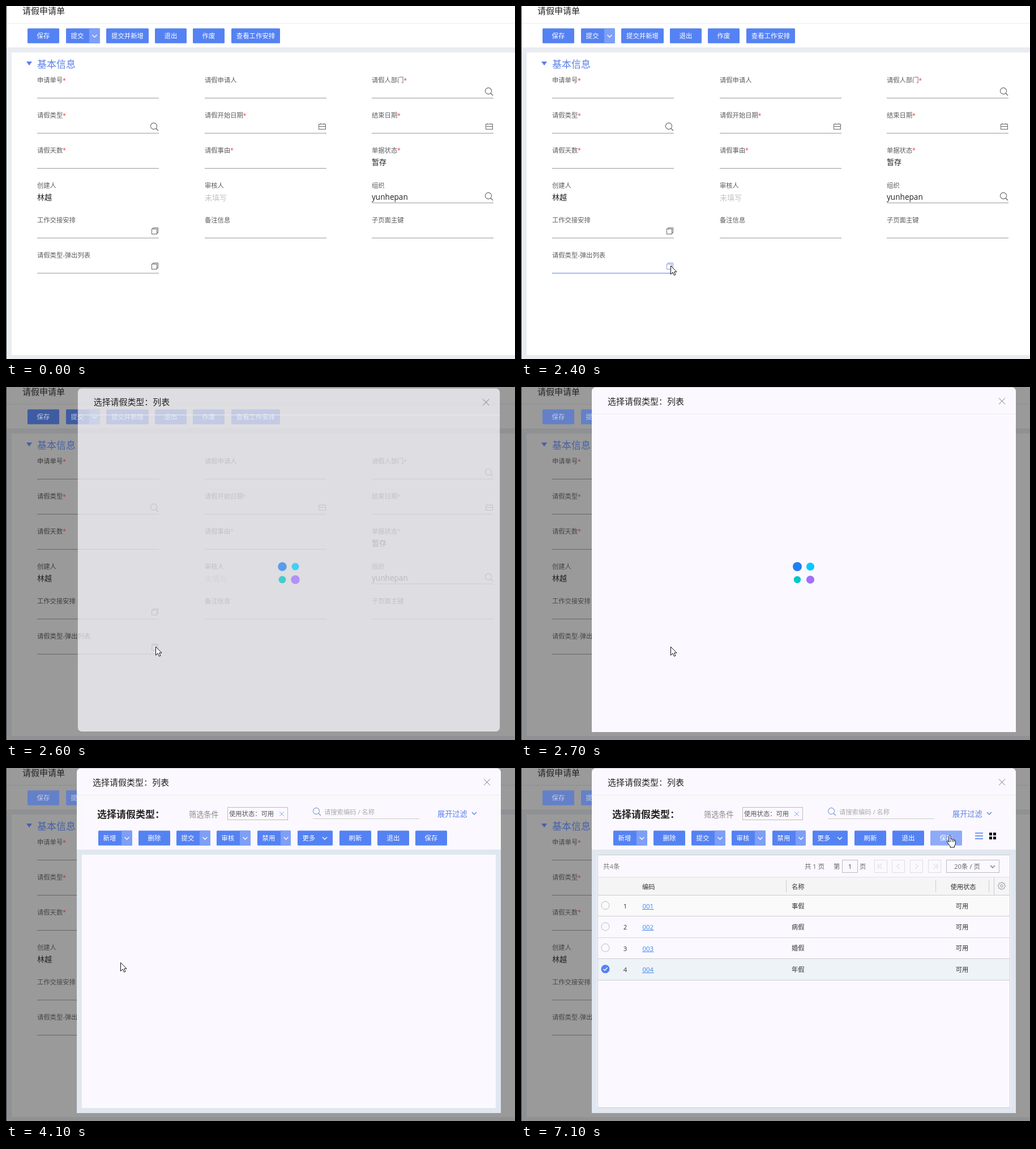
These frames come from a looping animation (899 px wide and 623 px high, 8000 ms). An HTML page with a canvas:

```html
<!DOCTYPE html>
<html lang="zh">
<head>
<meta charset="utf-8">
<title>请假申请单</title>
<style>
html, body { margin: 0; width: 100%; height: 100%; overflow: hidden; background: #fff; }
canvas { display: block; width: 899px; height: 623px; }
</style>
</head>
<body>
<canvas id="stage" width="899" height="623"></canvas>
<script>
const g = document.getElementById('stage').getContext('2d');
const LOOP = 8000, STEP = 100;
const FONT = "'Open Sans', 'Noto Sans CJK SC', 'Noto Sans CJK', sans-serif";
const BLUE = '#5582f3', PALE = '#7e9ff7', MODAL = '#fbf9ff';

const LIGHT = {
  page: '#fff', side: '#e9ecf1', rule: '#ececec', line: '#999', label: '#5c5c5c', text: '#222',
  hint: '#c3c3c3', star: '#f33', btn: BLUE, split: PALE, btnText: '#fff', head: '#5a80e8', icon: '#666'
};
const DIM = {
  page: '#9a9a9a', side: '#8f9194', rule: '#8e8e8e', line: '#666', label: '#454545', text: '#222',
  hint: '#7b7b7b', star: '#a33', btn: '#6480c8', split: '#7b92cc', btnText: '#c4cce2', head: '#4560a8', icon: '#484848'
};
const ENTER = { ...DIM, btn: '#3f5ba2', split: '#5f78b4', label: '#3c3c3c' };
const BAR = { ...LIGHT, weight: 500 };

function rect(x, y, w, h, c) { g.fillStyle = c; g.fillRect(x, y, w, h); }

function box(x, y, w, h, c) {
  g.strokeStyle = c; g.lineWidth = 1; g.strokeRect(x + .5, y + .5, w - 1, h - 1);
}

function round(x, y, w, h, r, c) {
  g.beginPath(); g.roundRect(x, y, w, h, r); g.fillStyle = c; g.fill();
}

function path(points, c, width = 1) {
  g.beginPath();
  points.forEach(([x, y], i) => i ? g.lineTo(x, y) : g.moveTo(x, y));
  g.strokeStyle = c; g.lineWidth = width; g.stroke();
}

function disc(x, y, r, c) { g.beginPath(); g.arc(x, y, r, 0, 7); g.fillStyle = c; g.fill(); }

function ring(x, y, r, c, width = 1) {
  g.beginPath(); g.arc(x, y, r, 0, 7); g.strokeStyle = c; g.lineWidth = width; g.stroke();
}

// y is the middle of the line; returns the text width
function text(s, x, y, size, c, align = 'left', weight = 400) {
  g.font = `${weight} ${size}px ${FONT}`;
  g.textAlign = align;
  g.fillStyle = c;
  g.fillText(s, x, y + size * .37);
  return g.measureText(s).width;
}

function chevron(x, y, c, s = 4) { path([[x - s, y - s / 2], [x, y + s / 2], [x + s, y - s / 2]], c, 1.3); }

function cross(x, y, s, c) {
  path([[x - s, y - s], [x + s, y + s]], c);
  path([[x - s, y + s], [x + s, y - s]], c);
}

function lens(x, y, c) {
  ring(x - 1, y - 1, 5.6, c, 1.1);
  path([[x + 3, y + 3], [x + 7, y + 7]], c, 1.2);
}

function calendar(x, y, c) {
  box(x - 6, y - 4, 13, 10, c);
  rect(x - 6, y, 13, 1, c);
  rect(x - 3, y - 5, 1, 2, c);
  rect(x + 3, y - 5, 1, 2, c);
}

function popup(x, y, c) {
  box(x - 6, y - 4, 10, 10, c);
  path([[x - 3.5, y - 4], [x - 3.5, y - 5.5], [x + 5.5, y - 5.5], [x + 5.5, y + 3.5], [x + 4, y + 3.5]], c);
}

// kind: 1 = split with a paler arrow part, 2 = arrow only
function button(x, y, w, label, p, kind = 0) {
  const h = 26.3;
  round(x, y + .4, w, h, 1.5, p.btn);
  if (kind === 1) round(x + 41, y + .4, w - 41, h, [0, 1.5, 1.5, 0], p.split);
  const mid = kind ? x + 20 : x + w / 2;
  text(label, mid, y + 13.5, 11.4, p.btnText, 'center', p.weight);
  if (kind) chevron(kind === 1 ? x + 50.5 : x + 48, y + 14, p.btnText);
}

const COLS = [55, 351, 646];
// column, row, label, required, icon, value, underlined
const FIELDS = [
  [0, 0, '申请单号', 1], [1, 0, '请假申请人', 0], [2, 0, '请假人部门', 1, lens],
  [0, 1, '请假类型', 1, lens], [1, 1, '请假开始日期', 1, calendar], [2, 1, '结束日期', 1, calendar],
  [0, 2, '请假天数', 1], [1, 2, '请假事由', 1], [2, 2, '单据状态', 1, null, '暂存', 0],
  [0, 3, '创建人', 0, null, '林越', 0], [1, 3, '审核人', 0, null, '未填写', 0], [2, 3, '组织', 0, lens, 'yunhepan'],
  [0, 4, '工作交接安排', 0, popup], [1, 4, '备注信息', 0], [2, 4, '子页面主键', 0],
  [0, 5, '请假类型-弹出列表', 0, popup]
];

function field([col, row, label, need, icon, value, lined = 1], p, pos) {
  const x = COLS[col], y = 131 + row * 61.8;
  const hot = p === LIGHT && pos && pos[0] > x && pos[0] < x + 216 && pos[1] > y + 8 && pos[1] < y + 32;
  const w = text(label, x, y, 11.3, p.label);
  if (need) text('*', x + w, y, 10, p.star);
  if (value === '未填写') text(value, x, y + 22, 13, p.hint);
  else if (value) text(value, x, y + 20.5, value.length > 4 ? 13.6 : 13, p.text);
  if (lined) rect(x, Math.round(y + 31), 215, 1, hot ? BLUE : p.line);
  if (icon) {
    const iy = Math.round(y + (icon === lens ? 20 : 19));
    const ix = x + (icon === popup ? 208 : 207);
    icon(ix, iy, hot ? '#8b9be8' : p.icon);
  }
}

function form(p, pos) {
  rect(0, 0, 899, 623, p.page);
  rect(1, 73, 898, 9, p.side);
  rect(1, 82, 9, 541, p.side);
  rect(1, 616, 898, 7, p.side);
  rect(0, 30, 899, 1, p.rule);
  rect(0, 0, 1, 623, '#333');
  text('请假申请单', 29, 8, 15, p.text);
  button(38, 39, 56, '保存', p);
  button(106, 39, 60, '提交', p, 1);
  button(177, 39, 75, '提交并新增', p);
  button(263, 39, 56, '退出', p);
  button(330, 39, 56, '作废', p);
  button(398, 39, 86, '查看工作安排', p);
  g.beginPath();
  g.moveTo(36, 98); g.lineTo(46, 98); g.lineTo(41, 105);
  g.fillStyle = p.head; g.fill();
  text('基本信息', 55, 102.5, 17, p.head);
  FIELDS.forEach(f => field(f, p, pos));
}

function spinner(t) {
  ['#2080f0', '#00caff', '#00c6c6', '#a070ff'].forEach((c, i) => {
    const r = 7.1 + .9 * Math.cos((t - 2700) / 800 * 2 * Math.PI - i * Math.PI / 2);
    disc(488 + i % 2 * 23, 317 + (i >> 1) * 23, r, c);
  });
}

function toolbar(t) {
  rect(125, 48, 749, 96, '#f9f9fb');
  rect(134, 58, 731, 86, MODAL);
  text('选择请假类型：', 161, 82, 17, '#222', 'left', 700);
  text('筛选条件', 323, 82, 13.2, '#888');
  box(391, 69, 107, 23, '#bbb');
  text('使用状态：可用', 394, 81, 11.3, '#555');
  cross(487, 81, 4, '#8ba6dc');
  lens(549, 77, '#8799cc');
  text('请搜索编码 / 名称', 562, 77.5, 11.3, '#aaa');
  rect(542, 89, 188, 1, '#ccc');
  text('展开过滤', 762, 81, 13.2, '#5a80e8');
  chevron(827, 80, '#5a80e8');
  const p = BAR, y = 110;
  button(163, y, 60, '新增', p, 1);
  button(234, y, 56, '删除', p);
  button(301, y, 60, '提交', p, 1);
  button(372, y, 60, '审核', p, 1);
  button(444, y, 59, '禁用', p, 1);
  button(515, y, 62, '更多', p, 2);
  button(589, y, 56, '刷新', p);
  button(656, y, 56, '退出', p);
  button(723, y, 56, '保存', t >= 7000 ? { ...p, btn: '#8eabf8' } : p);
}

function viewIcons() {
  for (let i = 0; i < 3; i++) rect(802, 114 + i * 5, 14, 1.6, BLUE);
  for (let i = 0; i < 4; i++) rect(827 + i % 2 * 7, 114 + (i >> 1) * 7, 5, 5, '#111');
}

function pager() {
  const y = 173.5;
  text('共4条', 145, y, 11.4, '#777');
  text('共 1 页', 501, y, 11.4, '#666');
  text('第', 552, y, 11.4, '#666');
  box(567, 162, 28, 23, '#bbb');
  text('1', 581, y, 11.4, '#444', 'center');
  text('页', 598, y, 11.4, '#666');
  for (let i = 0; i < 4; i++) {
    const x = 624 + i * 31.7 | 0, d = i < 2 ? -1 : 1, cx = x + 11.5;
    box(x, 162, 23, 23, '#ddd');
    path([[cx - d * 2, 169], [cx + d * 2.5, 173.5], [cx - d * 2, 178]], '#ccc');
    if (i % 3 === 0) path([[cx + d * 4.5, 169], [cx + d * 4.5, 178]], '#ccc');
  }
  box(751, 162, 94, 23, '#bbb');
  text('20条 / 页', 765, y, 11.4, '#666');
  chevron(833, 174, '#777');
}

function gear(x, y) {
  g.beginPath();
  for (let i = 0; i <= 32; i++) {
    const a = i / 32 * 2 * Math.PI, r = i % 4 < 2 ? 6.6 : 5.2;
    g.lineTo(x + r * Math.cos(a), y + r * Math.sin(a));
  }
  g.strokeStyle = '#8a8f9c'; g.lineWidth = 1; g.stroke();
  ring(x, y, 2.2, '#8a8f9c');
}

function header(wide) {
  rect(136, 192, 727, 32, '#f5f5f5');
  rect(136, 192, 727, 1, '#e2e2e2');
  (wide ? [468, 732, 826] : [391, 578, 672]).forEach(x => rect(x, 198, 1, 21, '#ccc'));
  rect(835, 192, 1, 32, '#ccc');
  rect(136, 224, 727, 1, '#ccc');
  text('编码', 214, 209.5, 11.3, '#333');
  text('名称', wide ? 478 : 401, 209.5, 11.3, '#333');
  text('使用状态', wide ? 781 : 628, 209.5, 11.3, '#333', 'center');
  gear(849, 208);
}

function rows(wide, checked, pos) {
  ['事假', '病假', '婚假', '年假'].forEach((name, i) => {
    const top = 225 + i * 37.4, y = 243.5 + i * 37.4, on = checked && i === 3;
    const hot = pos[1] >= top && pos[1] < top + 37;
    rect(136, top, 727, 37, on ? '#eef3f8' : hot ? '#eef3fd' : wide && !i ? '#fafafa' : MODAL);
    rect(136, Math.round(top + 36.4), 727, 1, '#ccc');
    if (on) {
      disc(149, y - 1, 7.5, BLUE);
      path([[145.5, y - 1], [148, y + 1.5], [152.5, y - 3.5]], '#fff', 1.5);
    } else ring(149, y - 1, 7, '#bbb');
    text(String(i + 1), 184, y, 11.4, '#333', 'center');
    const w = text('00' + (i + 1), 214.5, y, 11.4, '#3a86f0');
    rect(214, Math.round(y + 5.5), w + 1, 1, '#3a86f0');
    text(name, wide ? 478 : 401.5, y, 11.3, '#333');
    text('可用', wide ? 779 : 625.5, y, 11.3, '#333', 'center');
  });
}

function modal(t, pos) {
  const k = t < 2600 ? .17 : t < 2700 ? .7 : 1;
  const s = k < .2 ? .983 : k < 1 ? .995 : 1;
  g.save();
  g.translate(499.5, 304.5 + (1 - s) * 110);
  g.scale(s, s);
  g.translate(-499.5, -304.5);
  g.globalAlpha = k;
  const foot = k < 1 ? 7 : 0;
  round(125, .5, 749, 608.5, [7, 7, foot, foot], MODAL);
  g.globalAlpha = Math.min(1, k * 1.6);
  rect(125, 47, 749, 1, '#ececf0');
  text('选择请假类型：列表', 153, 25, 15, '#222');
  cross(849.5, 25, 5.5, '#777');
  g.restore();

  if (t >= 3200) {
    rect(125, 144, 749, 465, '#e0e7f0');
    rect(134, 153, 731, 447, MODAL);
  }
  if (t >= 3300) toolbar(t);
  if (t < 4000) {
    g.globalAlpha = k < .2 ? .35 : k;
    spinner(t);
    g.globalAlpha = 1;
  }
  if (t >= 4200) {
    viewIcons();
    box(135, 153, 729, 447, '#ccc');
  }
  const wide = t >= 5700;
  if (t >= 4300) header(wide);
  if (t >= 4700) {
    pager();
    rows(wide, t >= 5900, pos);
  }
}

// time, x, y
const TRACK = [
  [200, 862, 127], [400, 787, 238], [500, 781, 257], [700, 610, 226], [800, 500, 214], [900, 410, 232],
  [1000, 363, 257], [1200, 262, 363], [1400, 221, 418], [1500, 209, 437], [1700, 258, 461], [1800, 264, 458],
  [2700, 264, 458], [2900, 258, 371], [3200, 250, 341], [3600, 220, 338], [4100, 202, 343],
  [4700, 202, 345], [5000, 204, 380], [5500, 189, 357], [5800, 147, 356],
  [6100, 147, 356], [6300, 260, 318], [6600, 570, 190], [6900, 757, 118], [8000, 757, 118]
];

function cursorAt(t) {
  if (t < TRACK[0][0]) return null;
  const i = Math.max(1, TRACK.findIndex(k => k[0] >= t));
  const [t0, x0, y0] = TRACK[i - 1], [t1, x1, y1] = TRACK[i];
  const u = (t - t0) / (t1 - t0);
  return [Math.round(x0 + (x1 - x0) * u), Math.round(y0 + (y1 - y0) * u)];
}

const ARROW = 'M.5 .5V15.5L4 12L6.5 17.2L9 16.2L6.6 11.2H11Z';
const HAND = 'M4 1.5Q5.5 -.5 7 1.5V8Q9 6.5 10.3 8.3Q12 7.4 13 9.2Q15.2 8.8 15.5 11V15Q15 18 13.5 19V22H6V19.5Q4 18 .8 13Q-.5 10.5 1.5 10.5L4 13Z';

function cursor([x, y], hand) {
  const shape = new Path2D(hand ? HAND : ARROW);
  g.save();
  g.translate(hand ? x - 5 : x, y);
  g.fillStyle = '#fff'; g.fill(shape);
  g.strokeStyle = '#111'; g.lineWidth = 1; g.stroke(shape);
  if (hand) for (const fx of [7, 10.3, 13]) path([[fx, 9], [fx, 12.5]], '#111');
  g.restore();
}

function draw(t) {
  const pos = cursorAt(t);
  form(t < 2500 ? LIGHT : t < 2700 ? ENTER : DIM, pos);
  if (t >= 2500) modal(t, pos);
  if (pos) cursor(pos, t >= 7100);
}

const start = performance.now();
function tick() {
  const t = (performance.now() - start) % LOOP;
  draw(Math.floor(t / STEP) * STEP);
  requestAnimationFrame(tick);
}
tick();
</script>
</body>
</html>
```
